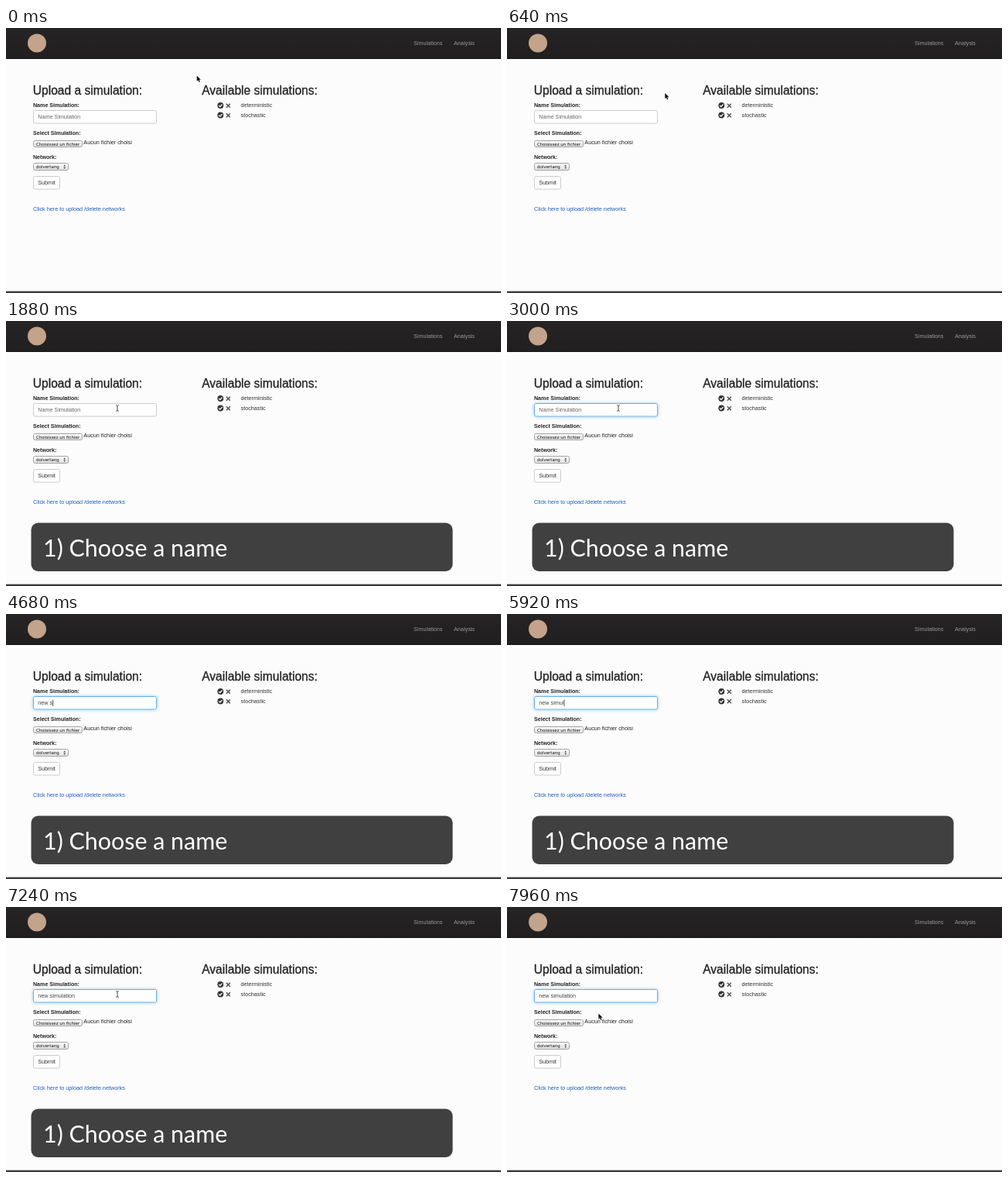
Animation of 640 by 342 pixels, one loop 8000 ms. Source, as an HTML page with a canvas:

```html
<!DOCTYPE html>
<html lang="en">
<head>
<meta charset="utf-8">
<title>Upload a simulation</title>
<style>
html, body { margin: 0; width: 100%; height: 100%; overflow: hidden; background: #fcfcfc; }
canvas { display: block; width: 640px; height: 342px; }
</style>
</head>
<body>
<canvas id="stage" width="640" height="342"></canvas>
<script>
const ctx = document.getElementById('stage').getContext('2d');
const LOOP = 8000;
const SANS = '"Liberation Sans", Arial, sans-serif';
const BODY = `7.25px ${SANS}`;
const LABEL = `bold 7.1px ${SANS}`;
const HEADING = `15.6px ${SANS}`;
const CONTROL = '5.5px "DejaVu Sans", sans-serif';
const BANNER = '30.4px Lato, sans-serif';

const TYPED = 'new simulation';
const KEY_TIMES = [3200, 3400, 3560, 4440, 4680, 4920, 5240, 5600, 5920, 6080, 6280, 6440, 6600, 6800];

const ramp = (t, from, to) => Math.min(1, Math.max(0, (t - from) / (to - from)));
const smooth = u => u * u * (3 - 2 * u);
const mix = (a, b, u) => a + (b - a) * u;

function text(str, x, y, font, color) {
  ctx.font = font;
  ctx.fillStyle = color;
  ctx.fillText(str, x, y);
}

function heading(str, x, y) {
  text(str, x, y, HEADING, '#222');
  ctx.strokeStyle = '#222';
  ctx.lineWidth = 0.3;
  ctx.strokeText(str, x, y);
}

function box(x, y, w, h, r, fill, stroke) {
  ctx.beginPath();
  ctx.roundRect(x, y, w, h, r);
  ctx.fillStyle = fill;
  ctx.fill();
  if (stroke) {
    ctx.strokeStyle = stroke;
    ctx.lineWidth = 1;
    ctx.stroke();
  }
}

function line(points, color, width) {
  ctx.beginPath();
  points.forEach(([x, y]) => ctx.lineTo(x, y));
  ctx.strokeStyle = color;
  ctx.lineWidth = width;
  ctx.stroke();
}

function vertical(y0, y1, top, bottom) {
  const g = ctx.createLinearGradient(0, y0, 0, y1);
  g.addColorStop(0, top);
  g.addColorStop(1, bottom);
  return g;
}

function disc(x, y, r, color) {
  ctx.beginPath();
  ctx.arc(x, y, r, 0, Math.PI * 2);
  ctx.fillStyle = color;
  ctx.fill();
}

function drawHeader() {
  ctx.fillStyle = vertical(0, 40, '#262425', '#201e1f');
  ctx.fillRect(0, 0, 640, 40);
  ctx.fillStyle = '#141313';
  ctx.fillRect(0, 39, 640, 1);
  disc(40, 19.5, 12, '#c3a389');
  text('Simulations', 527, 22, BODY, '#999');
  text('Analysis', 579, 22, BODY, '#999');
}

function drawEntry(name, y) {
  disc(277.3, y, 3.9, '#333');
  line([[275.2, y], [276.8, y + 1.6], [279.5, y - 1.5]], '#fff', 1.2);
  line([[284.8, y - 2.2], [289.8, y + 2.8]], '#555', 1.6);
  line([[289.8, y - 2.2], [284.8, y + 2.8]], '#555', 1.6);
  text(name, 303.5, y + 2, BODY, '#333');
}

function drawControl(x, y, w, h) {
  box(x, y, w, h, 2, vertical(y, y + h, '#fff', '#dedede'), '#a2a2a2');
}

function drawTriangle(x, y, dir) {
  ctx.beginPath();
  ctx.moveTo(x - 1.3, y);
  ctx.lineTo(x + 1.3, y);
  ctx.lineTo(x, y + 2 * dir);
  ctx.fillStyle = '#333';
  ctx.fill();
}

function drawInput(t) {
  const focus = ramp(t, 2280, 2440);
  const chars = KEY_TIMES.filter(k => t >= k).length;
  if (focus) {
    ctx.save();
    ctx.shadowColor = `rgba(102,175,233,${0.75 * focus})`;
    ctx.shadowBlur = 4;
    box(35, 106.5, 160, 17, 2, '#fff');
    ctx.restore();
  }
  const border = [mix(204, 102, focus), mix(204, 175, focus), mix(204, 233, focus)];
  box(35.5, 106.5, 159, 16.5, 2, '#fff', `rgb(${border})`);
  const value = TYPED.slice(0, chars);
  text(value || 'Name Simulation', 41.2, 117.4, BODY, value ? '#444' : '#666');

  const caretHidden = t >= 4280 && t < 4440;
  if (value && !caretHidden && t < 7240) {
    ctx.fillStyle = '#333';
    ctx.fillRect(41.4 + ctx.measureText(value).width, 110.5, 0.8, 8.5);
  }
}

function drawPage(t) {
  ctx.fillStyle = '#fcfcfc';
  ctx.fillRect(0, 0, 640, 342);
  drawHeader();

  heading('Upload a simulation:', 34.8, 86);
  text('Name Simulation:', 35, 101.5, LABEL, '#222');
  drawInput(t);
  text('Select Simulation:', 35, 138.4, LABEL, '#222');
  drawControl(35.5, 145.5, 63, 8);
  text('Choisissez un fichier', 39, 151.5, CONTROL, '#111');
  text('Aucun fichier choisi', 100.3, 150.2, BODY, '#222');
  text('Network:', 35, 168.5, LABEL, '#222');
  drawControl(35.5, 174.5, 45, 9);
  text('dolvertang', 39, 181, CONTROL, '#111');
  drawTriangle(75.7, 178.5, -1);
  drawTriangle(75.7, 179.7, 1);
  box(35.5, 191.5, 34, 16.5, 2, '#fff', '#ccc');
  text('Submit', 41.2, 202.2, BODY, '#333');
  text('Click here to upload /delete networks', 35, 235.6, BODY, '#1f5fb8');

  heading('Available simulations:', 253.2, 86);
  drawEntry('deterministic', 100);
  drawEntry('stochastic', 112.5);

  ctx.fillStyle = '#bbb';
  ctx.fillRect(0, 339, 640, 1);
  ctx.fillStyle = '#3a3a3a';
  ctx.fillRect(0, 340, 640, 2);
}

function drawBanner(t) {
  ctx.globalAlpha = smooth(ramp(t, 1520, 1860)) * (1 - smooth(ramp(t, 7240, 7680)));
  box(32.5, 260.5, 545, 62.5, 9, '#404040');
  text('1) Choose a name', 48, 304, BANNER, '#fff');
  ctx.globalAlpha = 1;
}

function drawArrow(x, y) {
  const outline = [[0, 0], [0, 7.2], [1.7, 5.7], [2.9, 8.4], [4.2, 7.8], [3, 5.2], [5.2, 5.1]];
  ctx.beginPath();
  outline.forEach(([dx, dy]) => ctx.lineTo(x + dx, y + dy));
  ctx.closePath();
  ctx.strokeStyle = '#fff';
  ctx.lineWidth = 1.2;
  ctx.stroke();
  ctx.fillStyle = '#111';
  ctx.fill();
}

function drawBeam(x, y) {
  line([[x, y - 3.5], [x, y + 3.5]], '#444', 1);
  for (const end of [-1, 1]) {
    line([[x - 2, y + 4 * end], [x, y + 3.2 * end], [x + 2, y + 4 * end]], '#444', 0.8);
  }
}

function drawPointer(t) {
  if (t >= 3200 && t < 7240) return;
  let x, y;
  if (t < 3200) {
    const u = ramp(t, 0, 1450);
    x = mix(246.7, 144, smooth(u));
    y = mix(61.5, 112.5, u);
  } else {
    const u = smooth(ramp(t, 7240, 7720));
    const nudge = ramp(t, 7880, 7960);
    x = mix(144, 118.8, u) - 0.4 * nudge;
    y = mix(112.5, 137.2, u) + 0.4 * nudge;
  }
  const overInput = x < 195 && y > 106 && y < 123.5;
  (overInput ? drawBeam : drawArrow)(x, y);
}

function frame() {
  const t = performance.now() % LOOP;
  drawPage(t);
  drawBanner(t);
  drawPointer(t);
  requestAnimationFrame(frame);
}
frame();
</script>
</body>
</html>
```
